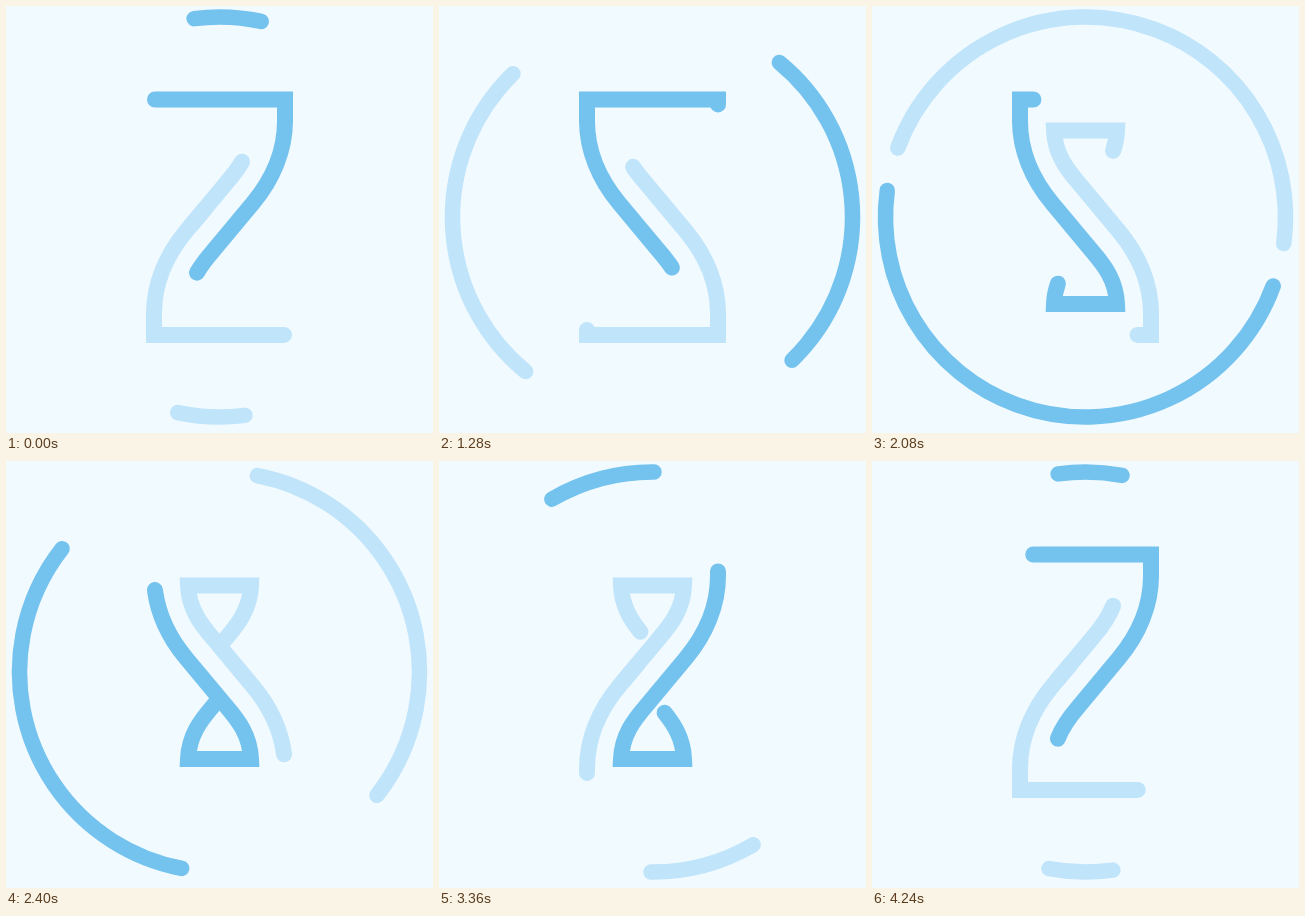
Recreate the animation shown at these times as an HTML page. Size 427x427 px, loop 4320 ms.

```html
<!DOCTYPE html>
<html lang="en">
<head>
<meta charset="utf-8">
<title>Hourglass loader</title>
<style>
  html, body { margin: 0; width: 100%; height: 100%; overflow: hidden; background: #f1faff; }
  svg { display: block; width: 100vw; height: 100vh; }
  .glass, .ring { fill: none; stroke-linecap: round; }
  .glass { stroke-width: 16; }
  .ring { stroke-width: 15.5; }
  .dark { stroke: #74c2ee; }
  .light { stroke: #c0e4fa; }
  .shade { fill: url(#fade); }
</style>
</head>
<body>
<svg viewBox="0 0 427 427">
  <defs>
    <linearGradient id="fade" x1="0" y1="0" x2="0" y2="1">
      <stop offset="0" stop-color="#123" stop-opacity=".22"/>
      <stop offset="1" stop-color="#123" stop-opacity="0"/>
    </linearGradient>
    <clipPath id="weave"><circle cx="191.7" cy="211" r="14"/></clipPath>
    <rect id="strip" x="-8.1" y="8.1" width="16.2" height="9"/>
  </defs>

  <g transform="rotate(180 213.5 211)"><circle class="ring light" cx="213.5" cy="211" r="200" pathLength="360"/></g>
  <circle class="ring dark" cx="213.5" cy="211" r="200" pathLength="360"/>

  <path class="glass light" transform="rotate(180 213.5 211.2)"/>
  <use class="shade self" href="#strip" transform="matrix(.64 .768 -.64 .768 213.5 184.8)"/>
  <use class="shade cross" href="#strip" transform="matrix(-.64 .768 .64 .768 235.3 211)"/>

  <path class="glass dark"/>
  <use class="shade self" href="#strip" transform="matrix(.64 .768 -.64 .768 213.5 237.2)"/>
  <use class="shade cross" href="#strip" transform="matrix(-.64 .768 .64 .768 191.7 211)"/>

  <!-- the light strand passes over the dark one at the left crossing -->
  <g clip-path="url(#weave)"><path class="glass light" transform="rotate(180 213.5 211.2)"/></g>
</svg>
<script>
const STEP = 80, STEPS = 54, PEAK = 23.85, MIN_HALF = 8.6;
const all = q => [...document.querySelectorAll(q)];
const glasses = all('.glass'), rings = all('.ring');
const selfShades = all('.self'), crossShades = all('.cross');

// Two laps, so that the visible half can run across the starting corner.
const lap = 'H279V115C279 144 267 173 247 197L207 245C195 259 183 274 182 298' +
  'H245C244 274 232 259 220 245L180 197C160 173 148 144 148 115V93.5';
glasses.forEach(p => p.setAttribute('d', 'M148 93.5' + lap + lap));
const length = glasses[0].getTotalLength() / 2, half = length / 2;

function bezier(x1, y1, x2, y2) {
  const at = (a, b, t) => 3 * a * t * (1 - t) ** 2 + 3 * b * t * t * (1 - t) + t ** 3;
  return x => {
    let lo = 0, hi = 1;
    for (let i = 0; i < 30; i++) {
      const t = (lo + hi) / 2;
      if (at(x1, x2, t) < x) lo = t; else hi = t;
    }
    return at(y1, y2, lo);
  };
}
const ease = bezier(.22, .1, .235, .96);

function drawRings(step) {
  const x = ((step - PEAK + STEPS) % STEPS) / (STEPS / 2);
  const turn = x < 1 ? .5 + ease(x) / 2 : (1 - ease(2 - x)) / 2;
  const reach = MIN_HALF + (90 - MIN_HALF) * (1 - Math.abs(2 * turn - 1));
  const from = 360 * turn - reach - 90;
  rings.forEach(r => {
    r.setAttribute('stroke-dasharray', `${2 * reach} 720`);
    r.setAttribute('transform', `rotate(${from} 213.5 211)`);
  });
}

function drawGlass(step) {
  const start = (1 - length * step / STEPS + length) % length;
  glasses.forEach(p => {
    p.setAttribute('stroke-dasharray', `${half} 9999`);
    p.setAttribute('stroke-dashoffset', -start);
  });
  const show = (list, a, b) => {
    const on = start < a - 12 && start + half > b + 12;
    list.forEach(s => s.setAttribute('visibility', on ? 'visible' : 'hidden'));
  };
  show(selfShades, 294, 497);
  show(crossShades, 260, 530);
}

const begin = performance.now();
function draw() {
  const step = Math.floor(Math.max(0, performance.now() - begin) / STEP) % STEPS;
  drawRings(step);
  drawGlass(step);
  requestAnimationFrame(draw);
}
draw();
</script>
</body>
</html>
```
